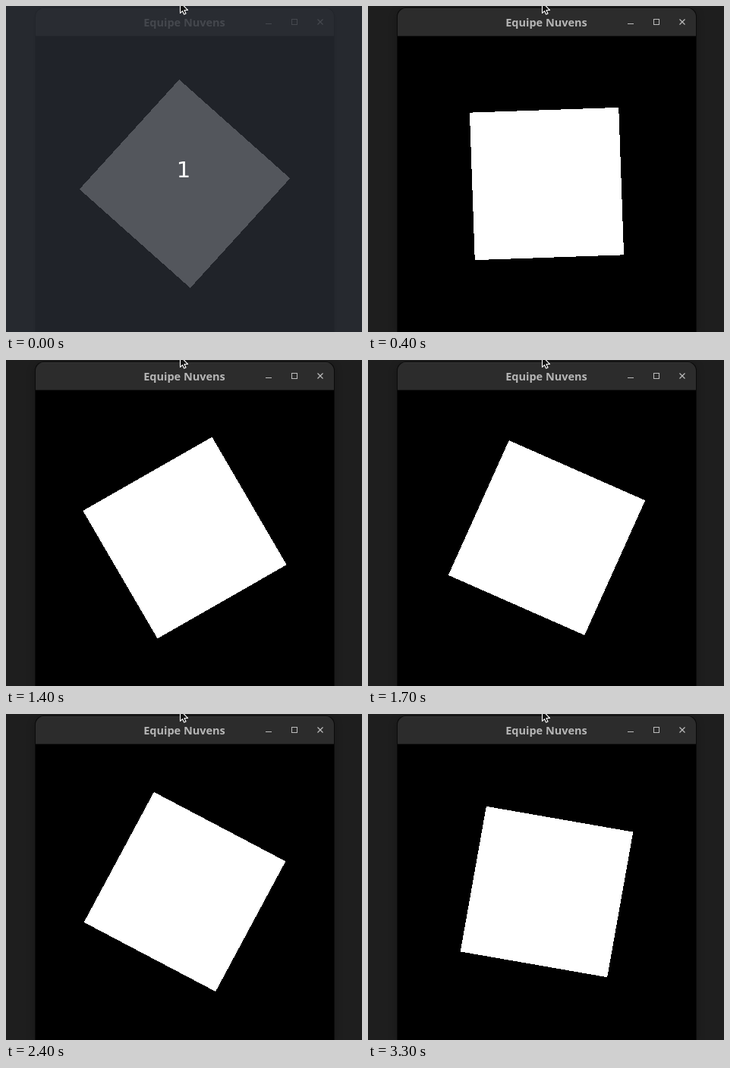
An HTML page that plays this animation: 469x430 px, repeating every 3.4 s.

```html
<!DOCTYPE html>
<html lang="pt">
<head>
<meta charset="utf-8">
<title>Equipe Nuvens</title>
<style>
  html, body { margin: 0; width: 100%; height: 100%; overflow: hidden; background: #1e1e1e; }
  .stage { position: absolute; left: 0; top: 0; width: 469px; height: 430px; overflow: hidden; contain: strict; }
  .window {
    position: absolute; left: 39px; top: 3px; width: 393px; height: 427px;
    border-radius: 11px 11px 0 0; background: #000; overflow: hidden;
    box-shadow: 0 0 0 1px #0b0b0b, 0 2px 12px rgba(0, 0, 0, .3);
  }
  .bar { height: 37px; background: #2c2c2c; box-shadow: inset 0 1px #353535, inset 0 -1px #1b1b1b; }
  svg { position: absolute; left: 0; top: 0; display: block; }
  .title { font: bold 14.5px "Noto Sans", "Open Sans", sans-serif; fill: #b6b6b6; }
  .count { font: 29px "DejaVu Sans", sans-serif; fill: #fff; }
</style>
</head>
<body>
<div class="stage">
<div class="window"><div class="bar"></div></div>
<svg width="469" height="430" viewBox="0 0 469 430">
  <text class="title" x="235" y="27" text-anchor="middle">Equipe Nuvens</text>
  <g fill="none" stroke="#bcbcbc">
    <path d="M342 23.5h8"/>
    <rect x="376.5" y="17.5" width="7" height="7"/>
    <path d="M410.5 17.5l7 7m0-7l-7 7" stroke-width="1.2"/>
  </g>
  <polygon id="square" fill="#fff" shape-rendering="crispEdges"/>
  <g id="countdown">
    <rect width="469" height="430" fill="#282c34" fill-opacity=".8"/>
    <text class="count" x="234" y="226" text-anchor="middle">1</text>
  </g>
  <path d="M229.5-5V9.4L232.5 6.6L234.6 11L237 9.9L235 5.5H239.5Z"
        fill="#111" stroke="#fff" stroke-width="1.1" stroke-linejoin="round"/>
</svg>
</div>
<script>
const LOOP = 3400, STEP = 100;
const CENTER = { x: 235.5, y: 234.5 }, RADIUS = { x: 138.9, y: 137.6 };
// [time in ms, rotation in degrees]; the spin is close to -12 degrees per step
const KEYS = [[0, 42], [400, -2], [1000, -72], [1400, -120],
              [2000, -192], [2700, -278], [3300, -350]];
const square = document.getElementById("square");
const countdown = document.getElementById("countdown");

function angleAt(t) {
  const i = Math.max(1, KEYS.findIndex(key => key[0] >= t));
  const [t0, a0] = KEYS[i - 1], [t1, a1] = KEYS[i];
  const angle = a0 + (a1 - a0) * (t - t0) / (t1 - t0);
  return Math.round(angle / 2) * 2;
}

function corners(angle) {
  return [45, 135, 225, 315].map(offset => {
    const a = (angle + offset) * Math.PI / 180;
    const x = CENTER.x + RADIUS.x * Math.cos(a);
    const y = CENTER.y + RADIUS.y * Math.sin(a);
    return x.toFixed(2) + "," + y.toFixed(2);
  }).join(" ");
}

function draw(now) {
  const t = Math.floor((now % LOOP) / STEP) * STEP;
  square.setAttribute("points", corners(angleAt(t)));
  countdown.style.display = t === 0 ? "" : "none";
}

const start = performance.now();
function tick() {
  draw(performance.now() - start);
  requestAnimationFrame(tick);
}
tick();
</script>
</body>
</html>
```
